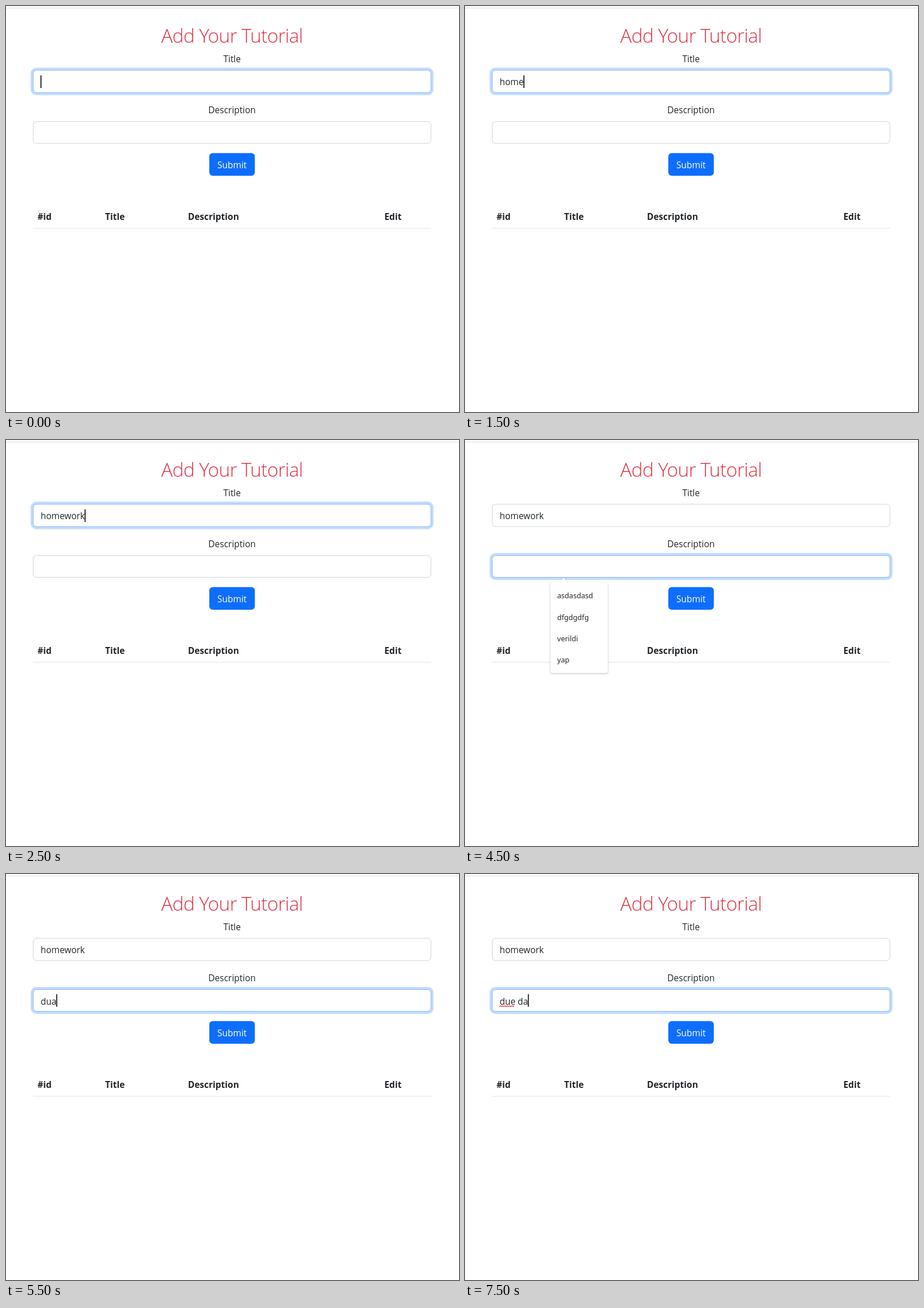
An HTML page that plays this animation: 791x708 px, repeating every 8000 ms.

```html
<!DOCTYPE html>
<html lang="en">
<head>
<meta charset="utf-8">
<title>Add Your Tutorial</title>
<style>
  html, body { margin: 0; width: 791px; height: 708px; overflow: hidden; background: #fff; }
  svg { display: block; }
  text { font: 15.5px "Open Sans", "Noto Sans", sans-serif; fill: #212529; white-space: pre; }
  .mid { text-anchor: middle; }
  .head { font-size: 33.5px; font-weight: 300; letter-spacing: -.65px; fill: #dc3545; }
  .bold { font-weight: 700; }
  .light { fill: #fff; }
  .value { font-size: 15.4px; }
  .menu text { font: 12.6px "Noto Sans", "Open Sans", sans-serif; }
  .menu path { filter: drop-shadow(0 1px 1.5px rgba(0, 0, 0, .28)); }
  .box { fill: #fff; stroke: #ced4da; }
  .ring { fill: #c2dbfe; visibility: hidden; }
  .focus .ring { visibility: visible; }
  .focus .box { stroke: #86b7fe; }
  .wave { fill: none; stroke: #f01414; stroke-width: 1.1; }
</style>
</head>
<body>
<svg width="791" height="708" viewBox="0 0 791 708">
  <rect y="3" width="791" height="1" fill="#dee0e2"/>
  <text class="mid head" x="394.7" y="64">Add Your Tutorial</text>
  <text class="mid" x="394.7" y="97.5">Title</text>
  <text class="mid" x="394.7" y="187">Description</text>

  <g id="title">
    <rect class="ring" x="43" y="107.5" width="703.5" height="48" rx="10"/>
    <rect class="box" x="47.5" y="112" width="694.5" height="39" rx="6"/>
    <text class="value" x="60.6" y="138"></text>
    <path class="wave"/>
    <rect class="caret" y="121" width="1.6" height="22"/>
  </g>
  <g id="desc">
    <rect class="ring" x="43" y="197" width="703.5" height="47" rx="10"/>
    <rect class="box" x="47.5" y="201.5" width="694.5" height="38" rx="6"/>
    <text class="value" x="60.6" y="227.5"></text>
    <path class="wave"/>
    <rect class="caret" y="209.5" width="1.6" height="22"/>
  </g>

  <rect x="355" y="256.5" width="79.5" height="39.5" rx="6" fill="#0d6efd"/>
  <text class="mid light" x="394.7" y="283">Submit</text>

  <text class="bold" x="55" y="373">#id</text>
  <text class="bold" x="173" y="373">Title</text>
  <text class="bold" x="317.7" y="373">Description</text>
  <text class="bold" x="660.7" y="373">Edit</text>
  <rect x="47" y="387" width="695.5" height="1" fill="#dee2e6"/>

  <g id="menu" class="menu">
    <path fill="#fff" d="M153 248H165L172 240.5L179 248H245.5a4 4 0 0 1 4 4V402.5a4 4 0 0 1-4 4H153a4 4 0 0 1-4-4V252a4 4 0 0 1 4-4z"/>
    <text x="161" y="276.3">asdasdasd</text>
    <text x="161" y="313.6">dfgdgdfg</text>
    <text x="161" y="350.9">verildi</text>
    <text x="161" y="388.2">yap</text>
  </g>
</svg>
<script>
const LOOP = 8000, LEFT = 60;

// [start ms, title, description, focused field, caret, misspelt letters, menu]
const steps = [
  [0, "", "", "title", 1, 0, 0],
  [500, "h", "", "title", 0, 0, 0],
  [1500, "home", "", "title", 1, 0, 0],
  [2500, "homework", "", "title", 1, 0, 0],
  [3500, "homework", "", "title", 1, 8, 0],
  [4500, "homework", "", "desc", 0, 0, 1],
  [5500, "homework", "dua", "desc", 1, 0, 0],
  [6500, "homework", "due", "desc", 1, 0, 0],
  [7500, "homework", "due da", "desc", 1, 3, 0]
];

function wave(width, y) {
  let d = `M${LEFT} ${y + 1}`;
  for (let x = 2, up = true; x <= width; x += 2, up = !up) {
    d += `L${LEFT + x} ${up ? y - 0.7 : y + 1}`;
  }
  return d;
}

function drawField(id, value, focused, caretOn, misspelt) {
  const field = document.getElementById(id);
  const text = field.querySelector("text");
  const caret = field.querySelector(".caret");
  const squiggle = field.querySelector(".wave");
  text.textContent = value;
  field.classList.toggle("focus", focused);
  const end = value ? text.getSubStringLength(0, value.length) : 0;
  caret.setAttribute("x", LEFT + 0.3 + end);
  caret.style.display = focused && caretOn ? "" : "none";
  const length = focused ? misspelt : 0;
  const base = Number(text.getAttribute("y")) + 2.8;
  squiggle.setAttribute("d", length ? wave(text.getSubStringLength(0, length), base) : "");
}

function draw([, title, desc, focus, caret, misspelt, menu]) {
  drawField("title", title, focus === "title", caret, misspelt);
  drawField("desc", desc, focus === "desc", caret, misspelt);
  document.getElementById("menu").style.display = menu ? "" : "none";
}

const begin = performance.now();
let shown;
function tick() {
  const t = (performance.now() - begin) % LOOP;
  const step = steps.findLast(s => s[0] <= t);
  if (step !== shown) draw(shown = step);
  requestAnimationFrame(tick);
}
tick();
</script>
</body>
</html>
```
